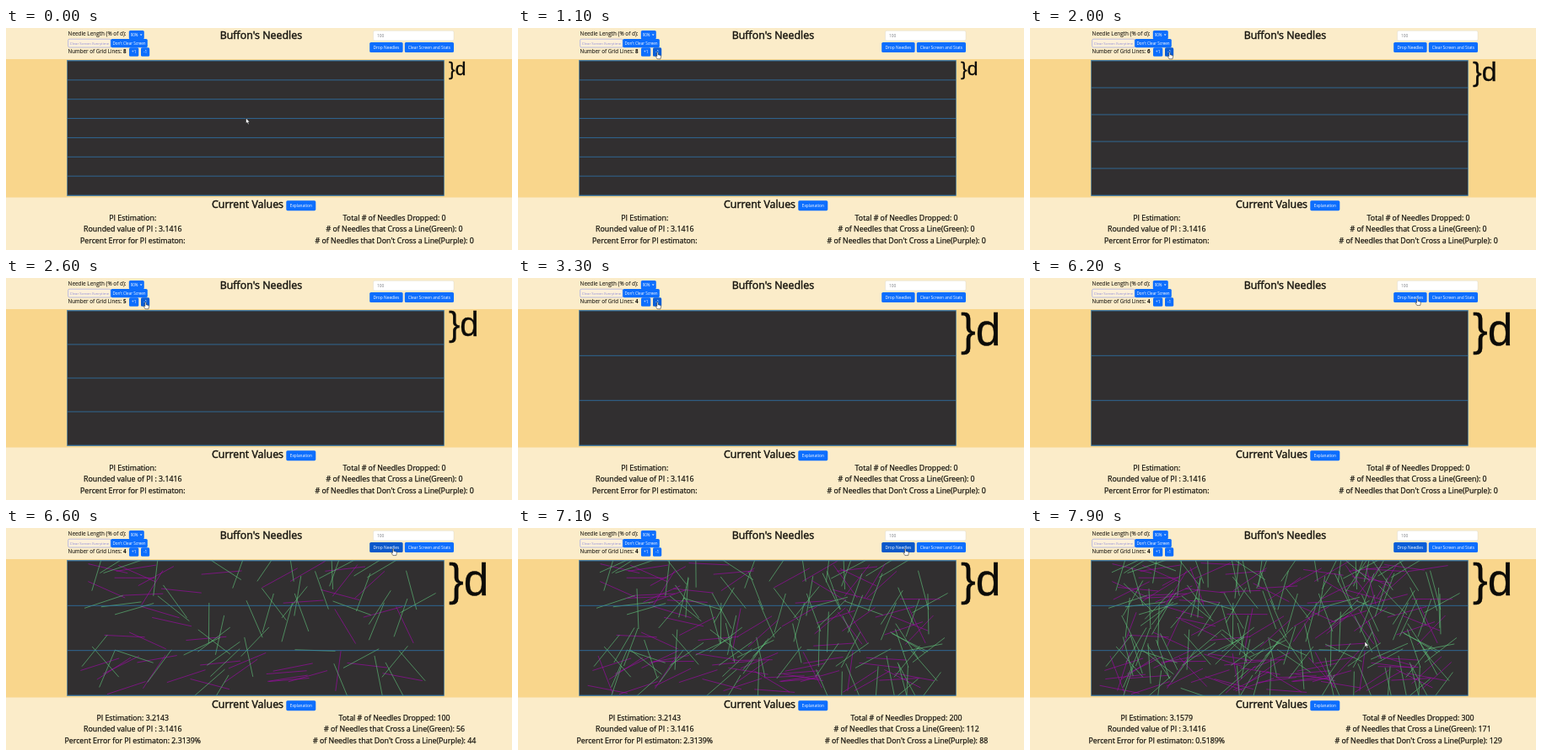
An HTML page for the animation above (8 s loop, 600 by 264 pixels).

```html
<!DOCTYPE html>
<html lang="en">
<head>
<meta charset="utf-8">
<title>Buffon's Needles</title>
<style>
  html, body { margin: 0; width: 100%; height: 100%; overflow: hidden; }
  svg { display: block; width: 100%; height: 100%; font-family: "Open Sans", "Noto Sans", sans-serif; }
  .ink { fill: #17150f; stroke: #17150f; stroke-width: .08; }
  .mid { text-anchor: middle; }
  .heading { font-size: 12.4px; stroke-width: .45; }
  .stat { font-size: 8.8px; stroke-width: .25; }
  .button { fill: #0d6efd; }
  .label { fill: #fff; font-size: 4.85px; }
  .needles { fill: none; stroke-width: .65; }
  #brace { font-family: "Liberation Sans", Arial, sans-serif; fill: #0c0b08; stroke: #0c0b08; stroke-width: .3; }
  #grid { fill: none; stroke: #2f7fbe; stroke-width: .7; }
</style>
</head>
<body>
<svg viewBox="0 0 600 264" preserveAspectRatio="none">
  <defs>
    <clipPath id="stage"><rect x="72.5" y="38" width="447" height="162"/></clipPath>
  </defs>
  <rect width="600" height="264" fill="#fbecc9"/>
  <rect y="37" width="600" height="164.5" fill="#f9d68c"/>
  <rect x="72.5" y="38.5" width="447" height="161" fill="#312f30" stroke="#4c8db8" stroke-width=".6"/>
  <g clip-path="url(#stage)">
    <g id="needles"></g>
    <path id="grid"/>
  </g>
  <text id="brace" x="525">}d</text>

  <text class="ink heading mid" x="302.4" y="12.6">Buffon's Needles</text>
  <text class="ink heading mid" x="286.5" y="214.4">Current Values</text>
  <text class="ink" x="73.6" y="9.3" font-size="6.4">Needle Length (% of d):</text>
  <text class="ink" x="73.6" y="29.8" font-size="6.2">Number of Grid Lines: <tspan id="count" font-weight="700"></tspan></text>
  <g id="stats"></g>

  <rect x="435.5" y="3.3" width="95.5" height="11.6" rx="1.7" fill="#fff" stroke="#d9d3c4" stroke-width=".4"/>
  <text x="440" y="11" font-size="4.9" fill="#777b80">100</text>
  <rect x="73.7" y="13.2" width="50.5" height="9.8" rx="1.5" fill="#fcf0da" stroke="#8f9be8" stroke-width=".6"/>
  <text class="mid" x="99" y="19.8" font-size="4.35" fill="#8d8ad6">Clear Screen Everytime</text>
  <g id="buttons"></g>
  <path d="M158.8 7.4h2.8l-1.4 1.6z" fill="#fff"/>

  <g id="pointer" stroke="#111" stroke-width=".5" stroke-linejoin="round" fill="#fff">
    <path id="arrow" d="M0 0V6.6L1.5 5.3L2.6 7.8L3.7 7.3L2.6 4.9H4.6Z"/>
    <path id="hand" d="M-.7 .5Q0-.5 .7 .5V3L3.6 3.7Q4.3 4 4.1 5.2L3.5 8H-.3L-2.2 5.1Q-2.2 4.1-1.3 4.5L-.7 5Z"/>
  </g>
</svg>
<script>
const LOOP = 8000, STEP = 100;
const LEFT = 73, TOP = 39, WIDTH = 446, HEIGHT = 160;
const LENGTH_RATIO = 0.9, FINAL_LINES = 4;
const GREEN = "#5fbd78", PURPLE = "#a00aa8";
const lineRemovals = [1300, 2000, 2500, 3000];
const drops = [
  { at: 6400, crossing: 56 },
  { at: 7000, crossing: 56 },
  { at: 7600, crossing: 59 }
];
// time, x, y of the pointer tip
const pointerPath = [
  [0, 284.5, 107], [900, 163, 30.5], [1000, 164, 30], [1100, 165.5, 28.8],
  [4700, 165.5, 28.8], [5400, 450, 48], [5700, 450, 48], [6200, 459.2, 24.6],
  [7600, 459.2, 24.6], [7900, 397, 135]
];

const $ = id => document.getElementById(id);

function add(parent, tag, attributes, content = "") {
  const node = document.createElementNS("http://www.w3.org/2000/svg", tag);
  for (const key in attributes) node.setAttribute(key, attributes[key]);
  node.textContent = content;
  return parent.appendChild(node);
}

function button(x, y, width, height, label, size = 4.85, shift = 0) {
  const face = add($("buttons"), "rect", { class: "button", x, y, width, height, rx: 1.6 });
  add($("buttons"), "text", {
    class: "label mid", x: x + width / 2 + shift, y: y + height / 2 + 1.75, style: `font-size:${size}px`
  }, label);
  return face;
}

button(145.8, 2.9, 18, 10.4, "90%", 4.5, -2.7);
button(124.2, 13, 43.6, 10.2, "Don't Clear Screen", 4.55);
button(146, 23.3, 11.3, 10.5, "+1");
const minus = button(160, 23.3, 10.2, 10.5, "-1");
const drop = button(431.2, 17, 39.4, 12, "Drop Needles");
button(472.8, 17, 58.2, 12, "Clear Screen and Stats");
button(332.3, 205.2, 35, 12, "Explanation", 4.75);

const stats = [150.3, 460.6].map(x =>
  [229.2, 242.4, 256].map(y => add($("stats"), "text", { class: "ink stat mid", x, y })));

let seed = 31415;
function random() {
  seed = (seed * 1664525 + 1013904223) % 4294967296;
  return seed / 4294967296;
}

function needle(mustCross) {
  const gap = HEIGHT / (FINAL_LINES - 1), margin = 30;
  for (;;) {
    const x = LEFT + margin + random() * (WIDTH - 2 * margin), y = random() * HEIGHT;
    const angle = random() * Math.PI, half = gap * LENGTH_RATIO / 2;
    const dx = Math.cos(angle) * half, dy = Math.sin(angle) * half;
    const crosses = Math.floor((y - dy) / gap) !== Math.floor((y + dy) / gap);
    if (crosses === mustCross)
      return `M${x - dx} ${TOP + y - dy}L${x + dx} ${TOP + y + dy}`;
  }
}

for (const batch of drops) {
  batch.group = add($("needles"), "g", { class: "needles" });
  const paths = { [PURPLE]: "", [GREEN]: "" };
  for (let i = 0; i < 100; i++) {
    const crosses = i < batch.crossing;
    paths[crosses ? GREEN : PURPLE] += needle(crosses);
  }
  for (const stroke in paths) add(batch.group, "path", { stroke, d: paths[stroke] });
}

function pointerAt(time) {
  const next = pointerPath.findIndex(point => point[0] > time);
  if (next < 0) return pointerPath.at(-1).slice(1);
  const [t0, x0, y0] = pointerPath[next - 1], [t1, x1, y1] = pointerPath[next];
  const p = (time - t0) / (t1 - t0), eased = p * p * (3 - 2 * p);
  return [x0 + (x1 - x0) * eased, y0 + (y1 - y0) * eased];
}

function drawGrid(time) {
  const lines = 8 - lineRemovals.filter(at => time >= at).length;
  const gap = HEIGHT / (lines - 1);
  let d = "";
  for (let i = 0; i < lines; i++) d += `M${LEFT} ${TOP + i * gap}h${WIDTH}`;
  $("grid").setAttribute("d", d);
  $("count").textContent = lines;
  $("brace").setAttribute("font-size", gap);
  $("brace").setAttribute("y", TOP + gap * 0.76);
}

function drawStats(time) {
  let total = 0, crossing = 0;
  for (const batch of drops) {
    const shown = time >= batch.at;
    batch.group.style.display = shown ? "" : "none";
    if (shown) { total += 100; crossing += batch.crossing; }
  }
  const pi = 2 * LENGTH_RATIO * total / crossing;
  const error = Math.abs(pi / Math.PI - 1) * 100;
  const texts = [[
    "PI Estimation:" + (total ? " " + pi.toFixed(4) : ""),
    "Rounded value of PI : 3.1416",
    "Percent Error for PI estimaton:" + (total ? ` ${error.toFixed(4)}%` : "")
  ], [
    `Total # of Needles Dropped: ${total}`,
    `# of Needles that Cross a Line(Green): ${crossing}`,
    `# of Needles that Don't Cross a Line(Purple): ${total - crossing}`
  ]];
  texts.forEach((column, i) => column.forEach((text, j) => stats[i][j].textContent = text));
}

function drawPointer(time) {
  const [x, y] = pointerAt(time);
  const onMinus = time >= 900 && time < 4800, onDrop = time >= 6100 && time < 7700;
  $("pointer").setAttribute("transform", `translate(${x} ${y})`);
  $("hand").style.display = onMinus || onDrop ? "" : "none";
  $("arrow").style.display = onMinus || onDrop ? "none" : "";
  minus.style.fill = onMinus && time >= 1000 ? "#0b5ed7" : "";
  // the clicked button keeps its focus shade after the pointer leaves
  drop.style.fill = time < 6300 ? "" : onDrop ? "#0a58ca" : "#0b5ed7";
}

function frame(now) {
  const time = Math.floor(now % LOOP / STEP) * STEP;
  drawGrid(time);
  drawStats(time);
  drawPointer(time);
  requestAnimationFrame(frame);
}
frame(performance.now());
</script>
</body>
</html>
```
